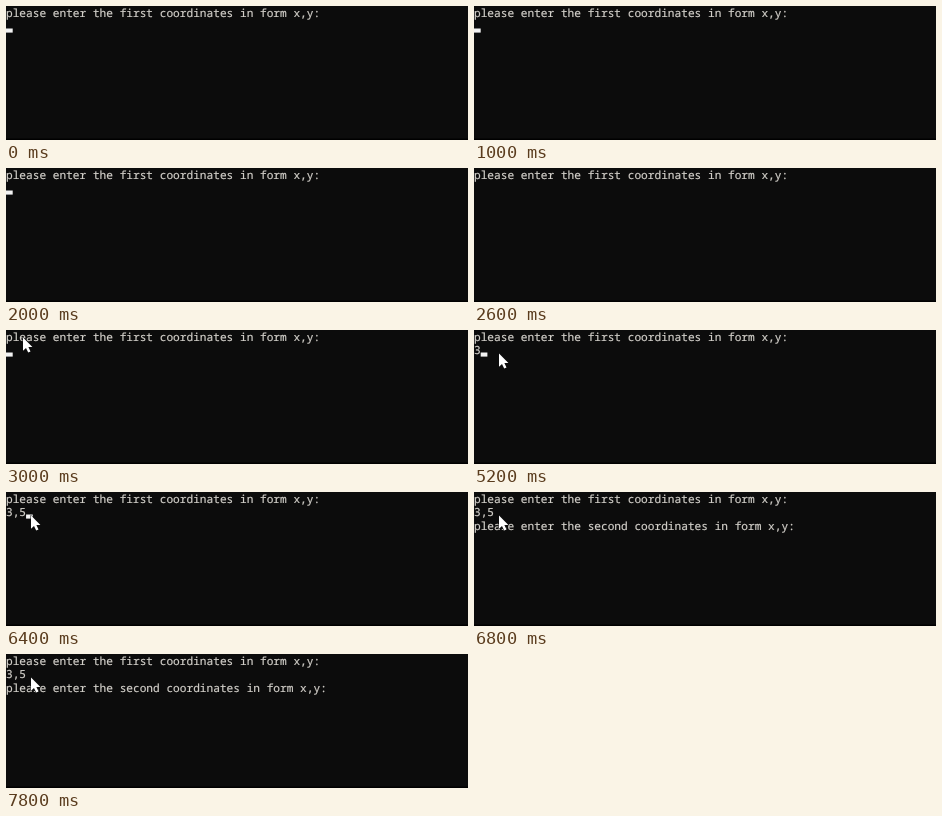
Write an HTML page that moves like this. It is 462 px wide and 134 px high and loops after 8000 ms.

```html
<!DOCTYPE html>
<html lang="en">
<head>
<meta charset="utf-8">
<title>Console prompt</title>
<style>
  html, body { margin: 0; width: 100%; height: 100%; overflow: hidden; background: #0c0c0c; }
  svg { display: block; width: 462px; height: 134px; }
  text {
    font: 11.15px "Noto Sans Mono", "DejaVu Sans Mono", monospace;
    fill: #d2cfc9;
    stroke: #d2cfc9;
    stroke-width: .2px;
    text-rendering: geometricPrecision;
  }
</style>
</head>
<body>
<svg viewBox="0 0 462 134">
  <rect width="462" height="134" fill="#0c0c0c"/>
  <rect y="132.5" width="462" height="1.5" fill="#000"/>
  <text y="10.9">please enter the first coordinates in form x,y:</text>
  <text id="answer" y="24.3"></text>
  <text id="second" y="37.7">please enter the second coordinates in form x,y:</text>
  <rect id="caret" width="6.7" height="4.1" fill="#f2f2f2"/>
  <path id="pointer" d="M0 0V13.2L3 10.4L5.2 15L7.5 14L5.4 9.5H9.4Z"
        fill="#fff" stroke="#0c0c0c" stroke-width="1" stroke-linejoin="round" paint-order="stroke"/>
</svg>
<script>
const LOOP = 8000, STEP = 200, CELL = 6.69, LINE = 13.4;
const ENTER = 6800;
const keys = [[4200, "3"], [5400, ","], [6200, "5"]];
// caret blink: [on, off]
const blinks = [[0, 400], [1000, 1400], [2000, 2600], [3000, 3600],
                [4200, 4600], [5000, 5800], [6200, 6800], [7200, 7600]];
const move = { show: 3000, end: 3400, from: [17, 7.5], to: [25, 23.5] };

const [answer, second, caret, pointer] =
  ["answer", "second", "caret", "pointer"].map(id => document.getElementById(id));
const show = (el, on) => el.setAttribute("visibility", on ? "visible" : "hidden");

function draw(t) {
  const typed = keys.filter(([at]) => t >= at).map(([, ch]) => ch).join("");
  const entered = t >= ENTER;
  answer.textContent = typed;
  show(second, entered);

  caret.setAttribute("x", entered ? 0 : typed.length * CELL);
  caret.setAttribute("y", 22.5 + (entered ? 2 * LINE : 0));
  show(caret, blinks.some(([on, off]) => t >= on && t < off));

  const k = Math.max(0, Math.min(1, (t - move.show) / (move.end - move.show)));
  const [x, y] = move.from.map((a, i) => a + (move.to[i] - a) * k);
  pointer.setAttribute("transform", `translate(${x} ${y})`);
  show(pointer, t >= move.show);
}

const start = performance.now();
function tick() {
  const t = (performance.now() - start) % LOOP;
  draw(Math.floor(t / STEP) * STEP);
  requestAnimationFrame(tick);
}
draw(0);
requestAnimationFrame(tick);
</script>
</body>
</html>
```
